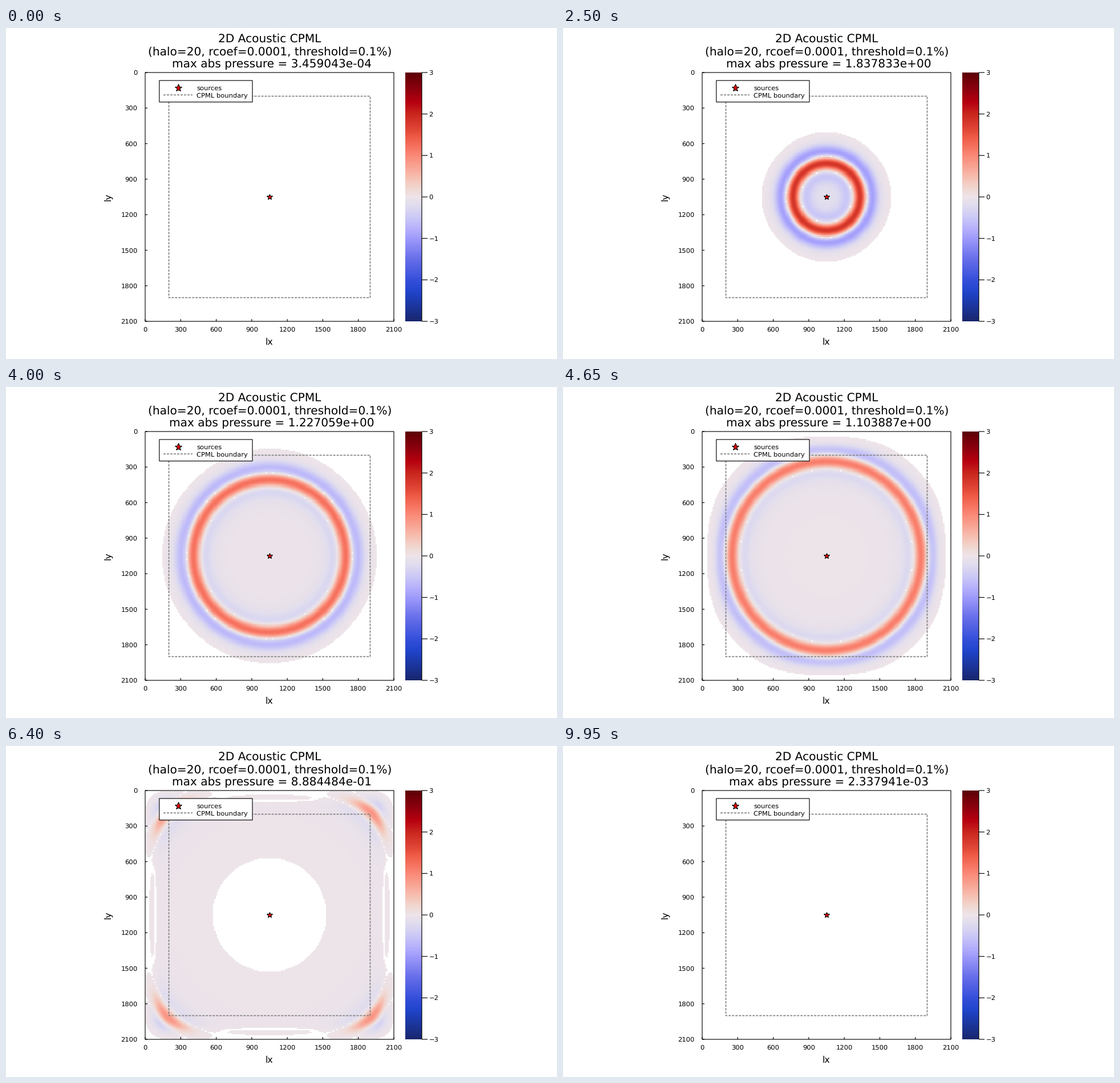
A matplotlib script that plays this animation: 966x580 px, repeating every 10000 ms.

```python
import matplotlib.pyplot as plt
import numpy as np
from matplotlib.animation import FuncAnimation
from matplotlib.colors import LinearSegmentedColormap
from matplotlib.patches import Rectangle

W, H, DPI = 966, 580, 100
FRAMES, INTERVAL, STEPS = 200, 50, 5

# Physics and grid
N, DX, DT = 211, 10.0, 0.0012
SPEED, FREQ = 2000.0, 8.0
HALO, RCOEF = 20, 1e-4
SRC_GAIN = 1.44
LIMIT, CUTOFF = 3.0, 0.003

# Plot box in pixels, y pointing down
LEFT, RIGHT, TOP, BOTTOM = 244, 680, 78, 514
LENGTH = (N - 1) * DX
SCALE = (RIGHT - LEFT) / LENGTH

STOPS = [
    (-3, "#19266e"), (-2.6, "#1c37a3"), (-2.3, "#2044cb"), (-2, "#3650db"),
    (-1.5, "#676ee9"), (-1, "#9f9bfc"), (-0.75, "#b8b3fb"), (-0.5, "#cbc8f7"),
    (-0.2, "#e1ddee"), (0, "#ede4e9"), (0.2, "#f0d8d2"), (0.5, "#f7bcae"),
    (1, "#fb8977"), (1.42, "#f05e49"), (1.6, "#e34a38"), (2, "#c9261f"),
    (2.3, "#b60010"), (2.6, "#8e000e"), (3, "#5d0006"),
]


def ricker(t):
    a = (np.pi * FREQ * (t - 1.2 / FREQ)) ** 2
    return (1 - 2 * a) * np.exp(-a)


def cpml(pos):
    """Absorbing-layer coefficients as columns, for positions in cells."""
    # Depth counts from the last node outside the layer.
    depth = (HALO + 1 - np.minimum(pos, N - 1 - pos)) / HALO
    d0 = -3 * SPEED * np.log(RCOEF) / (2 * HALO * DX)
    d = d0 * np.maximum(depth, 0) ** 2
    alpha = np.pi * FREQ * (1 - depth)
    b = np.exp(-(d + alpha) * DT)
    a = d * (b - 1) / (d + alpha)
    return a[:, None], b[:, None]


def simulate():
    """Pressure field at every shown step."""
    a_half, b_half = cpml(np.arange(N - 1) + 0.5)
    a_node, b_node = cpml(np.arange(1.0, N - 1))
    old = np.zeros((N, N))
    p = np.zeros((N, N))
    psi = np.zeros((N - 1, N - 2))
    xi = np.zeros((N - 2, N - 2))
    mid = N // 2
    fields = []
    for step in range(FRAMES * STEPS):
        grad = np.diff(p[:, 1:-1], axis=0) / DX
        psi = b_half * psi + a_half * grad
        lap = np.diff(grad + psi, axis=0) / DX
        xi = b_node * xi + a_node * lap
        lap = lap + xi
        new = np.zeros((N, N))
        # The field is symmetric, so the other axis is the transpose.
        new[1:-1, 1:-1] = (2 * p - old)[1:-1, 1:-1] \
            + (SPEED * DT) ** 2 * (lap + lap.T)
        new[mid, mid] += SRC_GAIN * ricker(step * DT)
        old, p = p, new
        if (step + 1) % STEPS == 0:
            fields.append(p)
    return fields


def pt(px):
    return px * 72 / DPI


plt.rcParams["font.family"] = "DejaVu Sans"
plt.rcParams["text.hinting"] = "none"
plt.rcParams["path.snap"] = False
fig = plt.figure(figsize=(W / DPI, H / DPI), dpi=DPI, facecolor="white")
ax = fig.add_axes([0, 0, 1, 1])
ax.axis("off")

cmap = LinearSegmentedColormap.from_list(
    "pressure", [((v + LIMIT) / (2 * LIMIT), c) for v, c in STOPS], N=255)
cmap.set_bad("white")


def text(x, y, s, size=11.5, ha="center", **kw):
    return ax.text(x, y, s, fontsize=pt(size), ha=ha, va="baseline", **kw)


def line(xs, ys, width=1.16, color="black", **kw):
    kw.setdefault("solid_capstyle", "butt")
    ax.plot(xs, ys, color=color, lw=pt(width), **kw)


def dashed(xs, ys, z):
    line(xs, ys, 1.7, "#808080", linestyle=(0, (2.35, 1.18)),
         dash_capstyle="butt", zorder=z)


def star(x, y, size, z):
    ax.plot([x], [y], marker="*", ms=pt(size), mfc="red", mec="black",
            mew=pt(1.16), ls="none", zorder=z)


def box(x0, y0, x1, y1, z, face="none"):
    ax.add_patch(Rectangle((x0, y0), x1 - x0, y1 - y0, facecolor=face,
                           edgecolor="black", lw=pt(1.16), zorder=z))


def image(data, extent):
    return ax.imshow(data, extent=extent, cmap=cmap, vmin=-LIMIT, vmax=LIMIT,
                     interpolation="nearest", aspect="auto", zorder=1)


# Pressure map, with half a cell cut off on each side
pad = DX / 2 * SCALE
field = image(np.zeros((N, N)),
              (LEFT - pad, RIGHT + pad, BOTTOM + pad, TOP - pad))
clip = Rectangle((LEFT, TOP), RIGHT - LEFT, BOTTOM - TOP,
                 transform=ax.transData)
field.set_clip_path(clip)

# Colour bar
image(np.linspace(LIMIT, -LIMIT, 255)[:, None], (700, 729, BOTTOM, TOP))
line([729, 729], [TOP, BOTTOM], zorder=3)
for v in range(-3, 4):
    y = TOP + (LIMIT - v) / (2 * LIMIT) * (BOTTOM - TOP)
    line([729, 739], [y, y], zorder=3)
    text(741.5, y + 4, str(v).replace("-", "\u2212"), ha="left")

ax.set_xlim(0, W)
ax.set_ylim(H, 0)

# Axes
box(LEFT, TOP, RIGHT, BOTTOM, 4)
for v in range(0, 2101, 300):
    x, y = LEFT + v * SCALE, TOP + v * SCALE
    line([x, x], [BOTTOM, BOTTOM - 4], zorder=4)
    line([LEFT, LEFT + 4], [y, y], zorder=4)
    text(x, 532, str(v))
    text(230.5, y + 4, str(v), ha="right")
text(461.5, 555, "lx", 15.8)
text(183, 296, "ly", 15.8, rotation=90, rotation_mode="anchor")

# Layer boundary and source
lo, hi = HALO * DX * SCALE, (LENGTH - HALO * DX) * SCALE
dashed([LEFT + lo, LEFT + hi, LEFT + hi, LEFT + lo, LEFT + lo],
       [TOP + lo, TOP + lo, TOP + hi, TOP + hi, TOP + lo], 3)
star((LEFT + RIGHT) / 2, (TOP + BOTTOM) / 2, 10, 5)

# Legend
box(268.8, 92, 432, 129.7, 6, "white")
star(302, 105, 13.4, 7)
dashed([276, 327], [117.3, 117.3], 7)
text(334, 109, "sources", ha="left", zorder=7)
text(334, 122, "CPML boundary", ha="left", zorder=7)

# Title
text(462, 25, "2D Acoustic CPML", 20.1)
text(462.5, 47, "(halo=20, rcoef=0.0001, threshold=0.1%)", 20.1)
status = text(466, 69, "", 20.1)

fields = simulate()


def update(i):
    p = fields[i]
    size = np.abs(p)
    field.set_data(np.ma.masked_where(size <= CUTOFF, p))
    status.set_text(f"max abs pressure = {size.max():.6e}")
    return field, status


anim = FuncAnimation(fig, update, frames=FRAMES, interval=INTERVAL,
                     init_func=lambda: update(0), repeat=True,
                     repeat_delay=0, blit=False)
plt.show()
```
